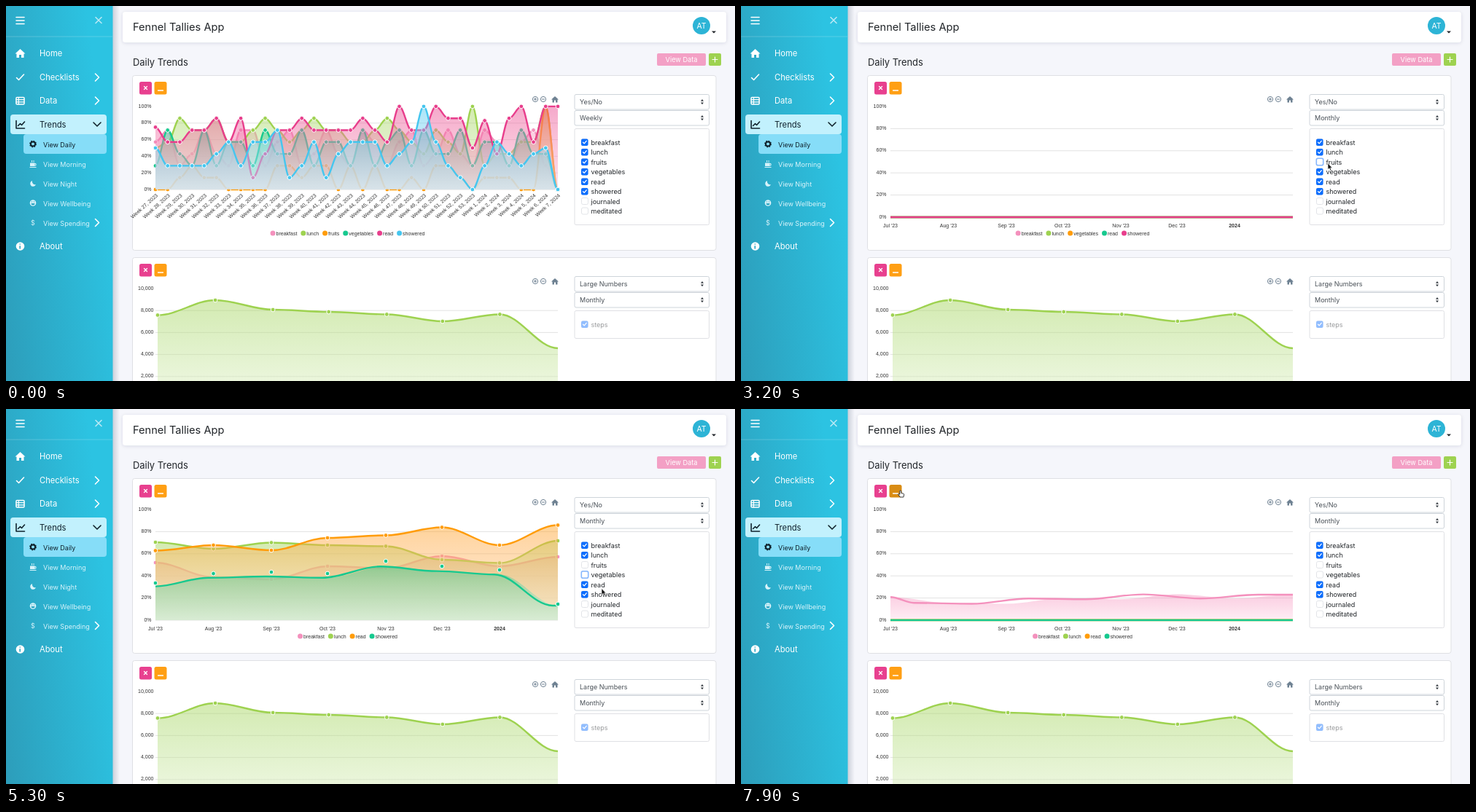
An HTML page that plays this animation: 1000 by 515 pixels, repeating every 8000 ms.

```html
<!DOCTYPE html>
<html lang="en">
<head>
<meta charset="utf-8">
<title>Daily Trends</title>
<style>
  html, body { margin: 0; width: 100%; height: 100%; overflow: hidden; background: #f5f6fb; }
  svg { display: block; width: 1000px; height: 515px; }
  text { font-family: Inter, sans-serif; dominant-baseline: central; }
  .axis { font-family: "Liberation Sans", Arial, sans-serif; font-size: 7px; fill: #333; }
  .line { fill: none; stroke-width: 2.4; stroke-linejoin: round; }
  .ico { fill: none; stroke-width: 1.6; stroke-linecap: round; stroke-linejoin: round; }
</style>
</head>
<body>
<svg id="stage" viewBox="0 0 1000 515"></svg>
<script>
const LOOP = 8000, SPEED = 800, STAGGER = 320, LEAD = 96;
const COLORS = ['#f491bd', '#9ed250', '#ff9c0a', '#17c98f', '#e83e8c', '#45c6ef'];
const HABITS = ['breakfast', 'lunch', 'fruits', 'vegetables', 'read', 'showered'];
const stage = document.getElementById('stage');
const pen = document.createElement('canvas').getContext('2d');
pen.font = '7px "Liberation Sans", Arial, sans-serif';

// markup helpers
const text = (x, y, s, size, attrs = '') => `<text x="${x}" y="${y}" font-size="${size}" ${attrs}>${s}</text>`;
const axis = (x, y, s, attrs = '') => `<text class="axis" x="${x}" y="${y}" ${attrs}>${s}</text>`;
const rect = (x, y, w, h, r, attrs) => `<rect x="${x}" y="${y}" width="${w}" height="${h}" rx="${r}" ${attrs}/>`;
const ico = (d, color = '#fff', attrs = '') => `<path class="ico" d="${d}" stroke="${color}" ${attrs}/>`;
const solid = (d, color = '#fff') => `<path d="${d}" fill="${color}"/>`;
const disc = (x, y, r, attrs) => `<circle cx="${x}" cy="${y}" r="${r}" ${attrs}/>`;

// smooth curve with level tangents at each point
function curve(pts) {
  return pts.map(([x, y], i) => {
    if (!i) return `M${x} ${y}`;
    const [px, py] = pts[i - 1], h = (x - px) * .35;
    return `C${px + h} ${py} ${x - h} ${y} ${x} ${y}`;
  }).join('');
}
const area = (pts, base) => `${curve(pts)}L${pts[pts.length - 1][0]} ${base}L${pts[0][0]} ${base}Z`;
const dots = (pts, color) => pts.map(([x, y]) => disc(x, y, 2.9, `fill="${color}" stroke="#fff" stroke-width="1"`)).join('');
const series = (pts, base, c, marks = pts) =>
  `<path class="fill" d="${area(pts, base)}" fill="url(#g${c})"/>
   <path class="line" d="${curve(pts)}" stroke="${COLORS[c]}"/>
   <g class="dots">${dots(marks, COLORS[c])}</g>`;

const gradients = COLORS.map((c, i) => `<linearGradient id="g${i}" x2="0" y2="1">
  <stop stop-color="${c}" stop-opacity=".45"/>
  <stop offset="1" stop-color="color-mix(in srgb, ${c} 30%, white)" stop-opacity=".5"/></linearGradient>`).join('');

function legend(names, y, first = 0) {
  const widths = names.map(n => pen.measureText(n).width + 13);
  let x = 468.5 - (widths.reduce((a, b) => a + b) - 5) / 2;
  return names.map((n, i) => {
    const s = disc(x + 3.5, y, 3.5, `fill="${COLORS[first + i]}"`) + axis(x + 8, y, n);
    x += widths[i];
    return s;
  }).join('');
}

function grid(top, base, labels, right = 199.5) {
  const step = (base - top) / 5;
  return labels.map((s, i) => (i ? `<path d="M205 ${top + i * step}H757" stroke="#e2e2e2"/>` : '') +
    axis(right, top + i * step - 1, s, 'text-anchor="end"')).join('');
}

// weekly figures, in days out of seven
const WEEKLY = {
  breakfast: i => i < 33 ? Math.round(3.6 + 1.9 * Math.sin(i * 1.9)) : 0,
  lunch: [3.5, 4, 6, 5, 5, 6, 4, 4, 5, 6, 5, 4, 5, 6, 5, 5, 4, 4, 5, 6, 5, 4, 3, 5, 4, 3, 7, 2, 3, 3, 4, 4, 7, 0],
  fruits: [0, 0, 1, 2, 1, 1, 0, 0, 0, 0, 2, 2, 1, 2, 2, 0, 2, 0, 2, 0, 0, 1, 0, 2, 2, 1, 0, 1, 1, 1, 0, 0, 7, 0],
  vegetables: i => i < 33 ? Math.round(3.5 - 1.7 * Math.cos(i * 2.4)) : 0,
  read: [5.25, 4, 4, 5, 5, 6, 4, 6, 1, 3, 5, 5, 6, 5, 5, 5, 5, 6, 5, 4, 7, 5, 5, 7, 6, 6, 3.5, 5.8, 3, 6, 7, 4, 7, 7],
  showered: [3.5, 2, 2, 2, 2, 3, 4, 2, 4, 4, 5, 1, 2, 4, 1, 3, 4, 4, 4, 2, 3, 4, 7, 4, 2, 1, 0, 2, 4, 3, 2, 3, 3.5, 0]
};
const weekX = i => 205 + i * 552 / 33;
const weekPts = name => Array.from({ length: 34 }, (_, i) => {
  const v = WEEKLY[name];
  return [weekX(i), 252 - 16.3 * (v.call ? v(i) : v[i])];
});
const weekLabels = Array.from({ length: 34 }, (_, i) => {
  const s = i < 27 ? `Week ${27 + i}, 2023` : `Week ${i - 26}, 2024`, x = weekX(i) + 2;
  return axis(x, 259, s, `text-anchor="end" transform="rotate(-42 ${x} 259)"`);
}).join('');

// monthly figures, as heights on the stage
const MONTH_X = [205, 284.5, 364, 441, 521, 598, 677, 757], BASE = 290;
const MONTHS = ["Jul '23", "Aug '23", "Sep '23", "Oct '23", "Nov '23", "Dec '23", '2024'];
const MONTHLY = {
  breakfast: [211, 231, 234, 216, 218.5, 202, 216, 203],
  lunch: [183, 192, 183.5, 187, 188.5, 207, 211.5, 181],
  fruits: [279, 272, 268, 270, 272, 268, 279, 252],
  vegetables: [226, 221, 219, 231, 221, 226, 216, 211],
  read: [194.5, 187, 194, 177, 173.5, 162.5, 187, 159.5],
  showered: [239, 226, 224, 226, 209, 216, 221, 268]
};
const monthPts = name => MONTHLY[name].map((y, i) => [MONTH_X[i], y]);
const monthLabels = (y, xs = MONTH_X) => MONTHS.map((m, i) =>
  axis(xs[i], y, m, `text-anchor="middle" ${i == 6 ? 'font-weight="bold"' : ''}`)).join('');

const PERCENT = ['100%', '80%', '60%', '40%', '20%', '0%'];
const weekChart = `<g id="week">${grid(138, 252, PERCENT)}
  ${HABITS.map((n, i) => series(weekPts(n), 252, i)).join('')}${weekLabels}${legend(HABITS, 312)}</g>`;
const SETS = [HABITS, HABITS.filter(n => n != 'fruits'), HABITS.filter(n => n != 'fruits' && n != 'vegetables')];
const monthChart = (names, id) => `<g id="month${id}">${grid(138, BASE, PERCENT)}
  ${names.map((n, i) => `<g class="s">${series(monthPts(n), BASE, i)}</g>`).join('')}
  ${monthLabels(301)}${legend(names, 312)}</g>`;

// page pieces
const card = (y, h, id = '') => rect(173.5, y + .5, 800.5, h, 3, `fill="#fff" stroke="#dfe0e4" ${id}`);
const buttons = (y, id = '') => rect(183, y, 17, 17.5, 2.5, 'fill="#e8408f"') +
  rect(203.5, y, 17, 17.5, 2.5, `fill="#ff9f14" ${id}`) +
  ico(`M189.500 ${y + 6.5}l4 4m0 -4l-4 4M208.500 ${y + 12}h7`, '#fff', 'style="stroke-width:1.300"');
const tools = y => `<g fill="none" stroke="#6e8192">${disc(726, y, 3.6, '')}${disc(737, y, 3.6, '')}
  <path d="M724 ${y}h4m-2 -2v4M735 ${y}h4"/></g>` +
  solid(`M748 ${y + .5}l5 -4.500 5 4.500h-1.500v4h-2.500v-3h-2v3h-2.500v-4z`, '#6e8192');
const select = (y, s, id = '') => rect(780, y + .5, 184.5, 20.5, 2, 'fill="#fff" stroke="#ced4da"') +
  text(787, y + 10.8, s, 9, `fill="#495057" ${id}`) +
  solid(`M953 ${y + 9.7}l2 -2.700 2 2.700zM953 ${y + 11.5}l2 2.700 2 -2.700z`, '#343a40');
const check = (y, s, on, id) => `<g id="${id}">
  ${rect(789.5, y - 4.5, 9, 9, 2, 'fill="#fff" stroke="#e2e4e8"')}
  ${on ? `<g class="on">${rect(789, y - 4.5, 9.5, 9.5, 2, 'fill="#0d6efd"')}
    ${ico(`M791.500 ${y + .2}l1.700 1.700 3 -3.600`, '#fff', 'style="stroke-width:1.300"')}</g>` : ''}
  ${rect(789.3, y - 4.7, 9.4, 9.4, 2, 'class="ring" fill="none" stroke="#86b7fe" stroke-width="1.6" style="display:none"')}
  ${text(802.5, y, s, 9, 'fill="#212529"')}</g>`;
const panel = (y, h) => rect(780, y + .5, 184.5, h, 2, 'fill="#fff" stroke="#dfe0e4"');

const chevron = (y, down) => down ? ico(`M120 ${y - 2.5}l5 5 5 -5`, '#10222c') : ico(`M122.500 ${y - 5}l5 5 -5 5`);
const item = (y, s, color = '#fff') => text(46, y, s, 11.2, `fill="${color}"`);
const sub = (y, s, color = '#d8f3fa') => text(51, y, s, 9, `fill="${color}"`);
const sidebar = rect(146, 0, 10, 515, 0, 'fill="url(#shade)"') + rect(0, 0, 146.5, 515, 0, 'fill="url(#side)"') +
  ico('M14 15.500H25M14 20H25M14 24.500H25') + ico('M123 15.500l8 8m0 -8l-8 8', '#b9e9f5') +
  '<path d="M0 42H146" stroke="#fff" stroke-opacity=".2"/>' +
  rect(6, 149, 132, 27, 4, 'fill="#c2f1fd"') + rect(24, 176, 114, 27, 4, 'fill="#86ddf8"') +
  solid('M12.500 65.500l7 -6.500 7 6.500h-2v5.500h-3.500v-4h-3v4h-3.500v-5.500z') + item(65, 'Home') +
  ico('M14.500 98.500l3 3 7 -7.500') + item(98, 'Checklists') + chevron(98) +
  rect(14, 125.5, 11, 9.5, 1, 'fill="none" stroke="#fff" stroke-width="1.5"') +
  ico('M14 128.700h11M14 131.900h11M17.300 126v9', '#fff', 'style="stroke-width:1.200"') + item(130, 'Data') + chevron(130) +
  ico('M14 157.500v10.500h11.500M16.500 164.500l3 -3 2 2 4 -4.500', '#10222c') + item(163, 'Trends', '#10222c') + chevron(162.5, true) +
  disc(37, 189.5, 3.1, 'fill="none" stroke="#10222c" stroke-width="2"') +
  disc(37, 189.5, 4.2, 'fill="none" stroke="#10222c" stroke-width="1.4" stroke-dasharray="1.65"') + sub(190, 'View Daily', '#10222c') +
  solid('M33 215.500h6.500v4.500h-6.500zM32.500 221h9v1h-9zM35 212h1v2.500h-1zM37.500 212h1v2.500h-1z', '#d8f3fa') +
  ico('M39.500 216.500h1.500v2.500h-1.500', '#d8f3fa', 'style="stroke-width:1"') + sub(217, 'View Morning') +
  solid('M36 240a4 4 0 1 0 5 5a4 4 0 0 1 -5 -5z', '#d8f3fa') + sub(244, 'View Night') +
  disc(37, 270.5, 4.3, 'fill="#d8f3fa"') + solid('M34.500 271h5a2.500 2.500 0 0 1 -5 0z', '#2ba5c3') +
  disc(35.5, 269, .7, 'fill="#2ba5c3"') + disc(38.5, 269, .7, 'fill="#2ba5c3"') + sub(271, 'View Wellbeing') +
  text(37, 297.5, '$', 9, 'fill="#d8f3fa" text-anchor="middle"') + sub(298, 'View Spending') + chevron(297.5) +
  disc(19.5, 330, 5.8, 'fill="#fff"') + ico('M19.200 329.700v3.300M19.200 327v.1', '#2ba5c3') + item(330, 'About');

const header = rect(160, 8, 828, 42, 4, 'fill="#fff" filter="url(#soft)"') +
  text(174, 29, 'Fennel Tallies App', 14.6, 'fill="#212529"') +
  disc(954, 27, 12, 'fill="#2db4d6"') + text(954, 27.3, 'AT', 10.5, 'fill="#fff" text-anchor="middle"') +
  solid('M968 34.500h6l-3 3z', '#212529') +
  text(174, 77.5, 'Daily Trends', 12.9, 'fill="#212529"') +
  rect(893, 65, 67, 17, 2, 'fill="#f3a0c5"') + text(926.5, 73.7, 'View Data', 9.2, 'fill="#fff" text-anchor="middle"') +
  rect(964, 65, 17, 17, 2, 'fill="#9ed250"') + ico('M969 73.500h7m-3.500 -3.500v7', '#fff', 'style="stroke-width:1.200"');

// the wider axis labels push this plot three pixels to the right
const STEP_X = MONTH_X.map(x => 208 + (x - 205) * 549 / 552);
const STEPS = [424.5, 404, 417, 420, 423.5, 433, 423.5, 470].map((y, i) => [STEP_X[i], y]);
const stepsCard = `<g id="steps">${card(345, 241)}${buttons(354)}${tools(378)}
  ${grid(388, 539, ['10,000', '8,000', '6,000', '4,000', '2,000', '0'], 202.5)}
  ${series(STEPS, 539, 1, STEPS.slice(0, 7))}${monthLabels(551, STEP_X)}${legend(['steps'], 562, 1)}
  ${select(371, 'Large Numbers')}${select(393, 'Monthly')}${panel(418, 38)}
  <g opacity=".45">${check(437, 'steps', true, 'total')}</g>
  ${card(595, 241)}${buttons(604)}</g>`;

const body = `<g id="body">${weekChart}${SETS.map(monthChart).join('')}${tools(128)}
  ${select(121, 'Yes/No')}${select(143, 'Weekly', 'id="period"')}
  ${rect(780, 143.5, 184.5, 20.5, 2, 'id="focus" fill="none" stroke="#7fd3f2" stroke-width="1.8"')}
  ${panel(168, 132)}
  ${[...HABITS, 'journaled', 'meditated'].map((n, i) => check(187 + i * 13.5, n, i < 6, 'box' + i)).join('')}</g>`;

stage.innerHTML = `<defs>${gradients}
  <linearGradient id="side" x1="0" y1="1" x2="1" y2=".6"><stop stop-color="#2d9dba"/><stop offset="1" stop-color="#2cc3e2"/></linearGradient>
  <linearGradient id="shade"><stop stop-color="#203050" stop-opacity=".2"/><stop offset="1" stop-color="#203050" stop-opacity="0"/></linearGradient>
  <filter id="soft" x="-5%" y="-20%" width="110%" height="140%"><feDropShadow dx="0" dy="1" stdDeviation="2.5" flood-color="#203050" flood-opacity=".12"/></filter></defs>
  ${rect(0, 0, 1000, 515, 0, 'fill="#f5f6fb"')}${header}
  ${card(95, 240, 'id="first"')}${buttons(104, 'id="fold"')}${body}${stepsCard}${sidebar}
  <g id="mouse"><path id="arrow" d="M0 0V8.500L2 6.800 3.400 9.800 4.800 9.100 3.500 6.300H6Z" fill="#111" stroke="#fff" stroke-width=".6"/>
  <path id="hand" d="M-1.200 -3.500q1 -1 2 0v3l3 .7q1 .4 .8 1.500l-.7 3.300h-4.600l-2.800 -4q.6 -1 2.300 .3z" fill="#fff" stroke="#222" stroke-width=".9"/></g>`;

const $ = s => stage.querySelector(s);
const show = (el, on) => { el.style.display = on ? '' : 'none'; };
const ease = p => .5 - Math.cos(Math.PI * Math.min(1, Math.max(0, p))) / 2;

// chart restarts: [time, month set]
const DRAWS = [[1700, 0], [3200, 1], [3600, 2], [7455, 2]];
const FOLD = [6900, 7455];
const PATH = [[50, 905, 520], [600, 850, 149], [880, 850, 149], [1100, 852.5, 167], [2550, 852.5, 167],
  [3000, 805, 216], [3300, 805, 216], [3550, 803, 229], [3700, 803, 229], [4050, 817, 246.5],
  [5950, 817, 246.5], [6400, 226, 105], [6520, 226, 105], [6600, 230.5, 110.5], [6750, 219, 116]];

const plots = SETS.map((names, id) => [...stage.querySelectorAll(`#month${id} .s`)].map((g, k) => ({
  pts: monthPts(names[k]), fill: g.querySelector('.fill'), line: g.querySelector('.line'), dots: g.querySelector('.dots')
})));

function grow(set, age) {
  plots[set].forEach((s, k) => {
    const p = ease((age - LEAD - k * STAGGER) / SPEED);
    const pts = s.pts.map(([x, y]) => [x, BASE - (BASE - y) * p]);
    // each stroke point slides in from its left neighbour
    const lag = pts.map(([x, y], i) => [i ? pts[i - 1][0] + (x - pts[i - 1][0]) * p : x, y]);
    if (p < 1) lag.push([757, pts[7][1]]);
    s.fill.setAttribute('d', area(pts, BASE));
    s.line.setAttribute('d', curve(lag));
    show(s.dots, age >= LEAD + SPEED);
  });
}

function pointer(t) {
  const i = PATH.findIndex(k => k[0] > t);
  if (i == 0) return null;
  if (i < 0) return PATH[PATH.length - 1].slice(1);
  const [t0, x0, y0] = PATH[i - 1], [t1, x1, y1] = PATH[i], p = ease((t - t0) / (t1 - t0));
  return [x0 + (x1 - x0) * p, y0 + (y1 - y0) * p];
}

function draw(t) {
  const folded = t >= FOLD[0] && t < FOLD[1], hover = t >= 6680;
  const now = DRAWS.filter(d => d[0] <= t).pop();
  show($('#week'), !now);
  SETS.forEach((_, i) => show($('#month' + i), now && now[1] == i));
  if (now) grow(now[1], t - now[0]);

  $('#period').textContent = now ? 'Monthly' : 'Weekly';
  show($('#focus'), t >= 900 && t < 3150);
  show($('#box2 .on'), t < 3150);
  show($('#box2 .ring'), t >= 3150 && t < 3550);
  show($('#box3 .on'), t < 3550);
  show($('#box3 .ring'), t >= 3550 && t < 6800);

  show($('#body'), !folded);
  $('#first').setAttribute('height', folded ? 35 : 240);
  $('#steps').setAttribute('transform', `translate(0 ${folded ? -205 : 0})`);
  $('#fold').setAttribute('fill', hover ? '#d98c14' : '#ff9f14');

  const at = pointer(t);
  show($('#mouse'), at);
  if (at) $('#mouse').setAttribute('transform', `translate(${at})`);
  show($('#arrow'), !hover);
  show($('#hand'), hover);
}

const begin = performance.now();
function tick() {
  draw((performance.now() - begin) % LOOP);
  requestAnimationFrame(tick);
}
tick();
</script>
</body>
</html>
```
